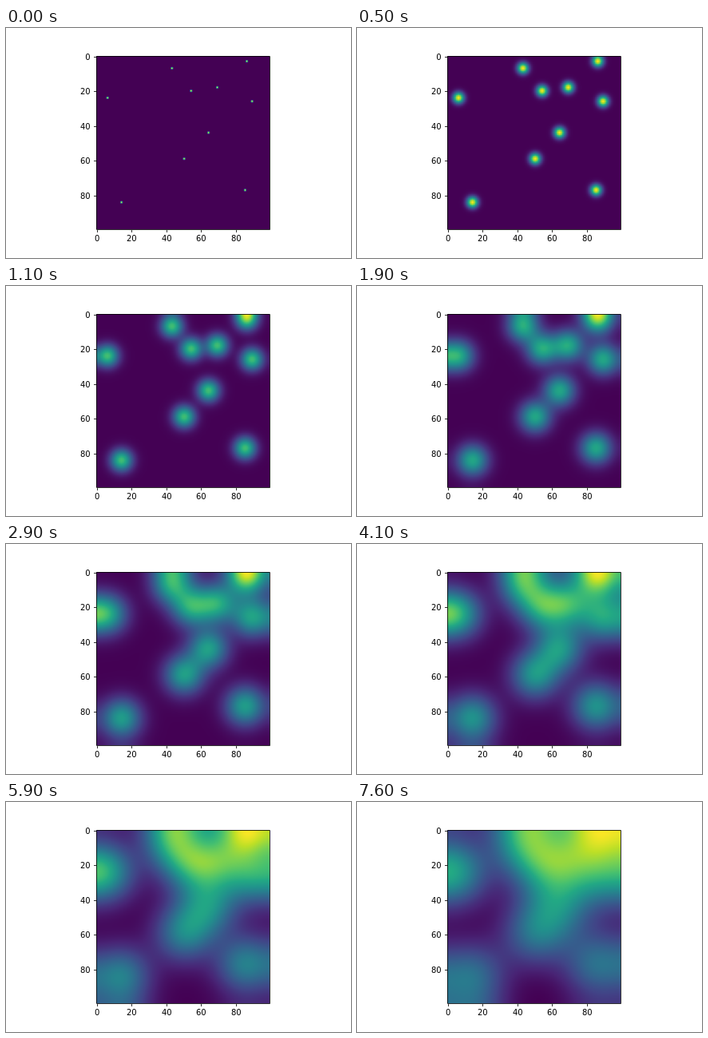
An HTML page with a canvas that plays this animation: 432x288 px, repeating every 8 s.

```html
<!DOCTYPE html>
<html lang="en">
<head>
<meta charset="utf-8">
<title>Heat diffusion</title>
<style>
  html, body { margin: 0; width: 432px; height: 288px; overflow: hidden; background: #fff; }
  canvas, svg { position: absolute; display: block; }
  canvas { left: 113px; top: 35px; }
  svg { left: 0; top: 0; }
  text { font: 10px "DejaVu Sans", sans-serif; fill: #000; }
</style>
</head>
<body>
<canvas id="heat" width="217" height="217"></canvas>
<svg id="axes" width="432" height="288" viewBox="0 0 432 288"></svg>
<script>
const LOOP = 8000, STEP = 100, START_STEP = 3, VARIANCE_PER_STEP = 2.4;
const GRID = 100, SIZE = 217, CELL = 2.18;
const SOURCES = [[86, 3], [43, 7], [54, 20], [69, 18], [6, 24], [89, 26], [64, 44], [50, 59], [85, 77], [14, 84]];
const VIRIDIS = ['440154', '482475', '414487', '355f8d', '2a788e', '21918c', '22a884', '44bf70', '7ad151', 'bddf26', 'fde725']
  .map(hex => [0, 2, 4].map(i => parseInt(hex.slice(i, i + 2), 16)));

const ctx = document.getElementById('heat').getContext('2d');
const image = ctx.createImageData(SIZE, SIZE);

// One-dimensional spread of a source between two insulated walls.
function spread(center, variance) {
  const images = [center, -1 - center, 2 * GRID - 1 - center];
  const bell = d => variance ? Math.exp(-d * d / (2 * variance)) : +(d === 0);
  return Array.from({ length: GRID }, (_, i) => images.reduce((sum, c) => sum + bell(i - c), 0));
}

// Hann interpolation from cells to pixels.
function resample(cells, offset) {
  return Array.from({ length: SIZE }, (_, p) => {
    const pos = Math.min(GRID - 1, Math.max(0, (p + offset + 0.5) / CELL - 0.5));
    const i = Math.floor(pos);
    const weight = 0.5 + 0.5 * Math.cos(Math.PI * (pos - i));
    return cells[i] * weight + cells[Math.min(GRID - 1, i + 1)] * (1 - weight);
  });
}

function eachValue(xs, ys, size, visit) {
  for (let y = 0; y < size; y++) {
    for (let x = 0; x < size; x++) {
      let value = 0;
      for (let s = 0; s < xs.length; s++) value += xs[s][x] * ys[s][y];
      visit(value, y * size + x);
    }
  }
}

function drawHeat(step) {
  const variance = Math.max(0, step - START_STEP) * VARIANCE_PER_STEP;
  const xs = SOURCES.map(([x]) => spread(x, variance));
  const ys = SOURCES.map(([, y]) => spread(y, variance));
  let low = Infinity, high = -Infinity;
  eachValue(xs, ys, GRID, value => {
    low = Math.min(low, value);
    high = Math.max(high, value);
  });

  const columns = xs.map(cells => resample(cells, 0));
  const rows = ys.map(cells => resample(cells, 1));
  eachValue(columns, rows, SIZE, (value, index) => {
    const level = 10 * Math.min(1, Math.max(0, (value - low) / (high - low)));
    const i = Math.min(9, Math.floor(level));
    for (let c = 0; c < 3; c++) {
      image.data[index * 4 + c] = VIRIDIS[i][c] + (VIRIDIS[i + 1][c] - VIRIDIS[i][c]) * (level - i);
    }
    image.data[index * 4 + 3] = 255;
  });
  ctx.putImageData(image, 0, 0);
}

function drawAxes() {
  const line = d => `<path d="${d}" fill="none" stroke="#000" stroke-opacity=".8"/>`;
  const label = (x, y, anchor, text) => `<text x="${x}" y="${y}" text-anchor="${anchor}">${text}</text>`;
  let markup = line('M113.5 35.5H330.5V252.5H113.5Z');
  for (let value = 0; value < GRID; value += 20) {
    const along = (value + 0.5) * 2.1744;
    const x = Math.round(112.68 + along), y = Math.round(34.56 + along);
    markup += line(`M${x + 0.5} 253V256`) + label(x + 0.3, 267, 'middle', value);
    markup += line(`M110 ${y + 0.5}H113`) + label(105.7, y + 4, 'end', value);
  }
  document.getElementById('axes').innerHTML = markup;
}

let shownStep = -1;
const startTime = performance.now();

function update() {
  const step = Math.floor((performance.now() - startTime) % LOOP / STEP);
  if (step !== shownStep) drawHeat(shownStep = step);
  requestAnimationFrame(update);
}

drawAxes();
update();
</script>
</body>
</html>
```
